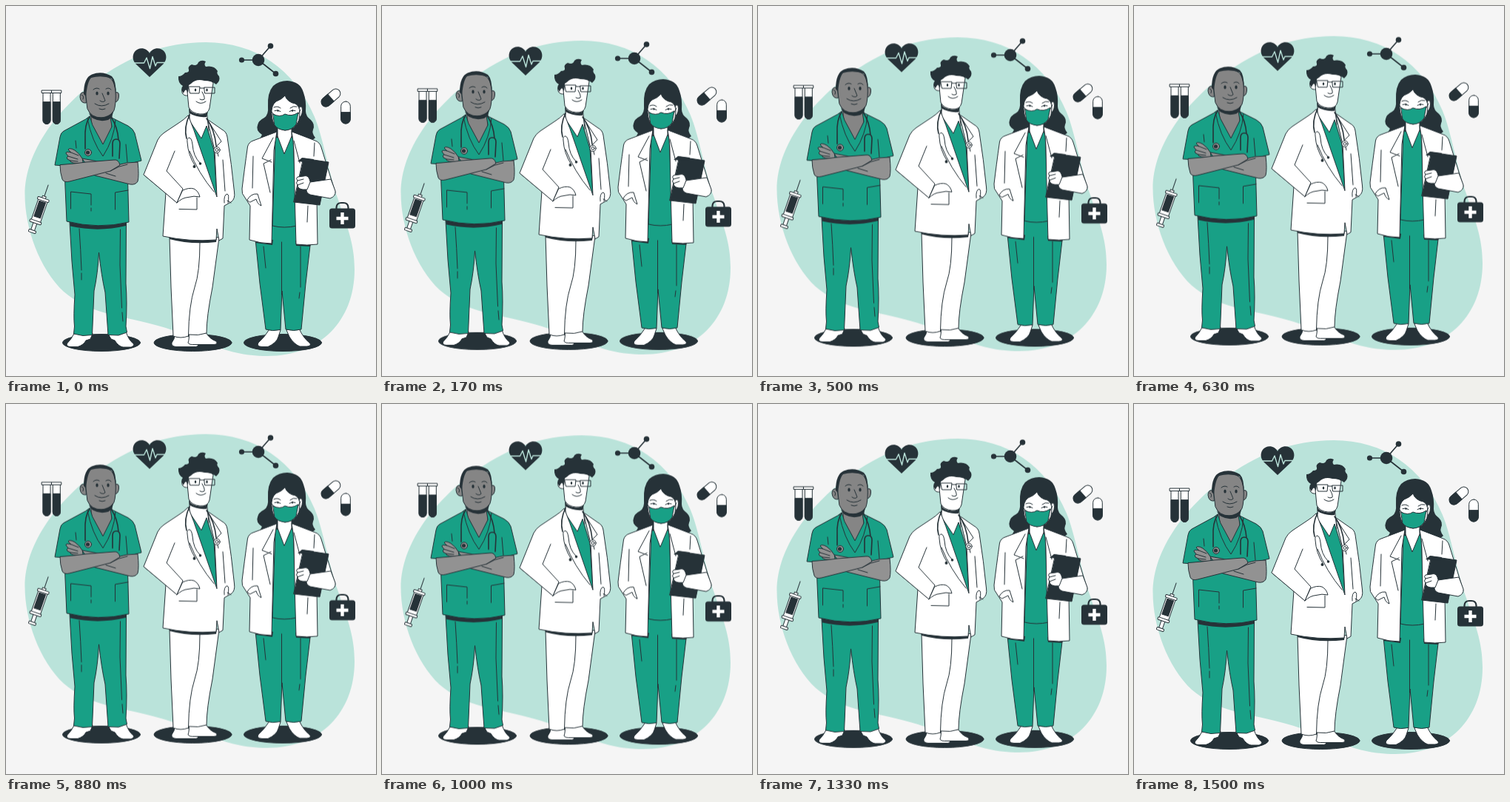
Write an HTML page that moves like this. It is 500 px wide and 500 px high and loops after 1540 ms.

```html
<!DOCTYPE html>
<html lang="en">
<head>
<meta charset="utf-8">
<title>Medical team</title>
<style>
  html, body { margin: 0; width: 100%; height: 100%; overflow: hidden; background: #f5f5f5; }
  svg { display: block; width: 100%; height: 100%; }
  path, ellipse, rect, circle { stroke: #263238; stroke-linejoin: round; stroke-linecap: round; }
  .blob { fill: #bae3da; stroke: none; }
  .g { fill: #18a086; }
  .w { fill: #fff; }
  .s { fill: #929292; }
  .f { fill: #858585; }
  .k { fill: #263238; }
  .l { fill: none; }
  .t { fill: none; stroke-width: 1.6; }
  .n { stroke: none; }
</style>
</head>
<body>
<svg viewBox="0 0 500 500">
<g id="scene">
  <path class="blob" d="M270 49C337 49 390 85 417 150C428 176 436 225 449 262C460 296 471 320 471 356C471 425 425 473 353 473C290 473 265 446 190 428C140 416 110 413 78 386C45 355 25.500 300 25.500 255C25.500 195 72 138 120 102C165 68 214 49 270 49Z"/>

  <g id="shadows" class="k n">
    <ellipse cx="129" cy="455" rx="52.500" ry="11.500"/>
    <ellipse cx="252.500" cy="455" rx="52.500" ry="11.500"/>
    <ellipse cx="374" cy="455" rx="52.500" ry="11.500"/>
  </g>

  <g id="tubes">
    <g id="tube">
      <path class="w" d="M50 117V154.500a5 5 0 0 0 10 0V117Z"/>
      <path class="k" d="M50 130V154.500a5 5 0 0 0 10 0V130Z"/>
      <rect class="w" x="48.500" y="114" width="13" height="3.500"/>
    </g>
    <use href="#tube" x="13.300"/>
  </g>

  <g id="heart">
    <path class="k n" d="M194 96L175.500 78.500C169 71.500 171 62 178 58.500C184 55.800 191 58 194 64C197 58 204 55.800 210 58.500C217 62 219 71.500 212.500 78.500Z"/>
    <path class="l" style="stroke:#bae3da;stroke-width:1.400" d="M172.500 77H186.500L190 70L194.500 84.500L198 68.500L202 81L204 76.500H215.500"/>
  </g>

  <g id="molecule">
    <path class="t" d="M318.500 73H341L357.500 54M341 73L364.500 91.500"/>
    <circle class="k n" cx="341" cy="73" r="8.300"/>
    <circle class="k n" cx="357.500" cy="54" r="3.800"/>
    <circle class="k n" cx="318.500" cy="73" r="3.600"/>
    <circle class="k n" cx="364.500" cy="91.500" r="3.800"/>
  </g>

  <g id="pills">
    <g id="pill" transform="translate(459 144)">
      <rect class="w" x="-6.300" y="-15" width="12.600" height="30" rx="6.300"/>
      <path class="k" d="M-6.300 0V8.700a6.300 6.300 0 0 0 12.600 0V0Z"/>
    </g>
    <use href="#pill" transform="translate(439 124) rotate(49) translate(-459 -144)"/>
  </g>

  <g id="syringe" transform="translate(45.700 275) rotate(19)">
    <path class="l" d="M0-35V-18"/>
    <rect class="w" x="-2.500" y="-19" width="5" height="5"/>
    <rect class="w" x="-6.500" y="-14" width="13" height="31"/>
    <rect class="k" x="-4.500" y="-11" width="9" height="22"/>
    <rect class="w" x="-8" y="-16" width="16" height="3.500" rx="1"/>
    <rect class="w" x="-2.500" y="19" width="5" height="11"/>
    <rect class="w" x="-8" y="16" width="16" height="3.500" rx="1"/>
    <rect class="w" x="-5" y="29.500" width="10" height="3.500" rx="1"/>
  </g>

  <g id="kit">
    <path class="l" style="stroke-width:2.200" d="M446.500 275V272Q447 266 453 266H456Q462 266 462.500 272V275"/>
    <rect class="k n" x="437" y="273.500" width="35" height="27" rx="3.500"/>
    <path class="l" style="stroke:#fff;stroke-width:4.400;stroke-linecap:butt" d="M446.500 287H462.500M454.500 279V295"/>
  </g>

  <g id="nurse">
    <path class="w" d="M93 441Q88 451 82.500 456Q81 460 87 460.500H97Q105 458 108 452L114 450L117 443Z"/>
    <path class="w" d="M138 443L142 450L147 452Q152 460 158 461H169Q174 459 172 456Q166 452 162 440Z"/>
    <path class="g" d="M86 292L89 345L93 390Q91 420 92.500 433L91.500 443L104 445.500L116.500 444.500L119 385Q124 362 125.500 333Q129 365 134 387L138 444.500L152 445L163.500 441L162 433Q164 400 162 375L162.500 292Z"/>
    <path class="l" d="M99 301Q101 330 102 357M102 361V370M154.500 302L154 350L156.500 408M157 414L158 426"/>
    <path class="k n" d="M86 290Q125 300 162 290V297Q125 306 87 297.500Z"/>
    <path class="f" d="M115 140V160L130 192L143 168V140Z"/>
    <path class="g" d="M113 149Q107 154 102 156L78 169Q74 171 73 177L66 215L79 216L80 245L82 291Q125 302 166 292L164 214L183 209L174 172Q172 166 165 162L141 150L143 163L131 187L117 161Z"/>
    <path class="l" d="M110 152Q116 183 131 203Q146 180 148 154M94 182L95 192M162 187L164 211"/>
    <path class="l" d="M87.500 274V251L115 254V269M115 273V277M147.500 275V252L165 249"/>
    <path class="t" d="M113 150Q106 160 107 180V193M142 150Q151 164 152 181M144 203V186Q144 180 149 180Q154 180 154 186L153 206"/>
    <circle class="s" cx="111" cy="198" r="4.500"/>
    <circle class="k n" cx="110.500" cy="198" r="2.600"/>
    <path class="s" d="M103 206L150 215Q162 211 178 211Q180 229 178 237Q175 242 168 241L120 229Z"/>
    <path class="s" d="M103 206Q99 199 93 195Q86 191 84 194L88 198Q81 196 81 199L84 203Q81 204 83 207L87 209Q86 211 91 212L104 213Z"/>
    <path class="l" d="M88 198L98 202M84 203L97 207M87 209L97 210"/>
    <path class="s" d="M73 215Q73 225 76 234Q78 239 86 237L141 223L154 215Q152 207 146 208L108 211L92 213Z"/>
    <path class="l" d="M141 223Q152 216 164 214M135 226L148 230"/>
    <path class="f" d="M107 117Q100 115 100 123Q101 132 108 131ZM148 117Q153 115 152.500 122Q152 130 147 130Z"/>
    <path class="f" d="M107 112Q107 94 127 93Q147 94 148 113Q149 132 146 141Q141 152 129 151Q115 151 110 139Z"/>
    <path class="k n" d="M105 119Q105 97 116 92.500Q130 87 143 95Q149 101 148.500 119Q147 108 143 98Q129 93 115 97Q110 102 108 122Z"/>
    <path class="k n" d="M112 144Q117 150 128 150.500Q139 150 145 142Q144 151 138 154Q127 157 118 152Q113 149 112 144Z"/>
    <ellipse class="k n" cx="123" cy="118" rx="1.700" ry="2.500"/>
    <ellipse class="k n" cx="138" cy="118" rx="1.700" ry="2.500"/>
    <path class="l" d="M118 113Q122 109.500 126 112M135 112Q139 109.500 142 113M130 118Q133 125 134 128Q131 131 127 128M120 132Q129 138 139 132M126 139Q130 141 134 139M102 120Q106 121 104 126"/>
  </g>

  <g id="doctor">
    <path class="w" d="M228 445Q228 450 224 455Q223 460 230 460.500H253Q261 461 259 457Q250 454 246 445Z"/>
    <path class="w" d="M247 441Q248 450 246 455Q247 458 255 457.500H281Q287 457 284 453Q275 450 270 441Z"/>
    <path class="w" d="M221 312L223 380L226 446Q236 450 246.500 446L247 444Q260 446 271 442Q271 420 279 380L288 313Z"/>
    <path class="l" d="M262 319Q262 360 255 380Q247 405 246.500 446"/>
    <path class="k n" d="M220 309L285 312L284 319Q250 323 221 315Z"/>
    <path class="w" d="M248 140V158L262 182L274 168L271 140Z"/>
    <path class="g" d="M250 158L264 179L271 162L281 195L285 258L262 222Z"/>
    <path class="w" d="M246 148Q240 154 235 157L214 171Q208 175 205 181L186 228L229 264L216 252L212 311Q248 319 284 316L285 301L288 317L293 314L295 270L304 265Q310 261 308.500 251Q305 215 299 177Q298 170 292 167L272 153L282 195L285 258L254 168Z"/>
    <path class="w" d="M186 228L231 266L239 247L217 223L228 196"/>
    <path class="w" d="M231 266Q238 259 246 258.500Q254 256 262 258Q260 250 254 247Q247 245 239 249Z"/>
    <path class="l" d="M234 274.500L258 275V259M293 208L296 250M295 266Q294 255 299 254Q302 255 300 266M299 263L304 266"/>
    <path class="l" d="M248 196Q260 226 281 251M273 155L291 183L284 190L287 203"/>
    <path class="t" d="M248 147Q240 164 244 179M271 152Q282 167 284 189"/>
    <path class="l" d="M255 215Q246 201 245 184Q244 178 248 178Q251 179 252 187Q253 203 262 212"/>
    <circle class="k n" cx="254.500" cy="217" r="2"/>
    <circle class="k n" cx="262.500" cy="213" r="1.800"/>
    <circle class="w" cx="285" cy="194.500" r="4.200"/>
    <circle class="l" cx="285" cy="194.500" r="2"/>
    <path class="w" d="M245 110Q236 109 238 117Q240 122 246 121Z"/>
    <path class="w" d="M244 106L247 137Q251 145 262 146Q273 147 275 138L280 104L272 95L250 97Z"/>
    <path class="k n" d="M247 138Q251 146 262 146.500Q269 147 273 143L271 150Q258 151 248 145Z"/>
    <path class="k n" d="M240 118Q235 112 239 108Q232 104 233 95Q238 95 242 90Q248 90 247 86Q245 82 251 79Q258 82 260 76Q264 72 270 75Q267 79 270 82Q281 80 286 88Q284 91 288 95Q290 101 284 106Q278 101 268 101Q257 98 250 105L247 107L246 118Q243 109 240 118Z"/>
    <path class="l" d="M247 109H262L261 118H249ZM268 110L282 110V118H269ZM262 111L268 111M244 111H247"/>
    <ellipse class="k n" cx="256" cy="113.500" rx="1.200" ry="1.900"/>
    <ellipse class="k n" cx="271.500" cy="113.500" rx="1.200" ry="1.900"/>
    <path class="l" d="M265 116Q269 123 268 126Q265 128 262 126M257 129Q263 134 270 129"/>
  </g>

  <g id="surgeon">
    <path class="k n" d="M380 101Q398 102 402 117Q406 128 405 142Q405 149 412 154Q418 160 415 167Q413 172 418 178Q411 185 401 181L357 179Q350 185 342 181L346 174Q337 168 340 161Q341 155 349 151Q355 147 354 136Q353 117 361 108Q369 101 380 101Z"/>
    <path class="w" d="M356 437Q349 448 341 455Q338 460 346 460.500H354Q366 455 368 447L371 438Z"/>
    <path class="w" d="M379 438L383 447Q389 457 397 460H407Q414 459 410 455Q402 449 396 436Z"/>
    <path class="g" d="M337 315L343 375L351 437Q360 440 371 437.500L373 385L378 437Q389 440 399 437L405 375L412 315V290H340Z"/>
    <path class="l" d="M372.500 319V390M348 325L351 354M398 325V380M397 387L396 395"/>
    <path class="k n" d="M336 314L361 316L360 323L337 320ZM391 317L413 318L411 325L392 324Z"/>
    <path class="g" d="M364 178L360 297Q376 301 393 297L388 178Z"/>
    <path class="w" d="M367 160V176L376 200L386 176V160Z"/>
    <path class="w" d="M366 170L334 182Q328 184 326.500 190Q322 222 319 247Q318 254 323 259L330 270L329 316Q344 321 359 321L362 195Q364 182 366 170Z"/>
    <path class="w" d="M386 170Q389 186 389 197Q390 260 392 322Q407 324 421 322L420 260L445 252L426 191Q424 184 418 182Z"/>
    <path class="l" d="M361 178L346 206L359 211M358 208L348 213L357 252M334 203L333 246M389 182L397 212M417 185L416 203M408 270L407 292"/>
    <path class="w" d="M326 262Q331 253 340 254L345 270Q340 268 338 261L330 265Z"/>
    <path class="k" d="M402 206L436 211L424 269L389 265Z"/>
    <path class="k n" d="M394 210L400 205L416 207L414 212Z"/>
    <path class="w" d="M411 238L439 234L445 250Q446 257 438 260L411 255Q405 252 406 247Z"/>
    <path class="w" d="M410 234Q408 228 402 230L394 231Q391 233 394 236Q391 239 394 242Q394 247 401 248L407 248L411 238Z"/>
    <path class="l" d="M394 236L402 234M394 242L402 239"/>
    <path class="w" d="M397 136Q402 135 400 145Q398 152 394 150Z"/>
    <path class="w" d="M359 147Q358 134 365 129Q373 126 377 121Q380 130 391 132Q397 135 397 145Q397 166 377 168Q360 166 359 147Z"/>
    <path class="g" d="M361 146Q370 151 377 146Q386 150 395 144L392 160Q386 168 377 168Q367 167 363 161Z"/>
    <path class="l" d="M359 143L362 147M398 140L395 146M362 137Q367 134.500 371 138M384 138Q388 134.500 393 136"/>
    <path class="l" d="M363 141.500Q367 139.500 371 142.500M383 142.500Q387 139.500 391 141.500"/>
    <circle class="k n" cx="367.500" cy="141.500" r="1.200"/>
    <circle class="k n" cx="387" cy="141.500" r="1.200"/>
  </g>
</g>
</svg>
<script>
  // Linear float at 24 steps per second, with a short rest before each loop.
  const LOOP = 1540, HALF = 750, RISE = 10;
  const pose = (ms, y) => ({
    offset: ms / LOOP,
    transform: `translateY(${y}px)`,
    easing: 'steps(18, end)'
  });
  document.getElementById('scene').animate(
    [pose(0, 0), pose(HALF, -RISE), pose(2 * HALF, 0), pose(LOOP, 0)],
    { duration: LOOP, iterations: Infinity, delay: -5 }
  );
</script>
</body>
</html>
```
